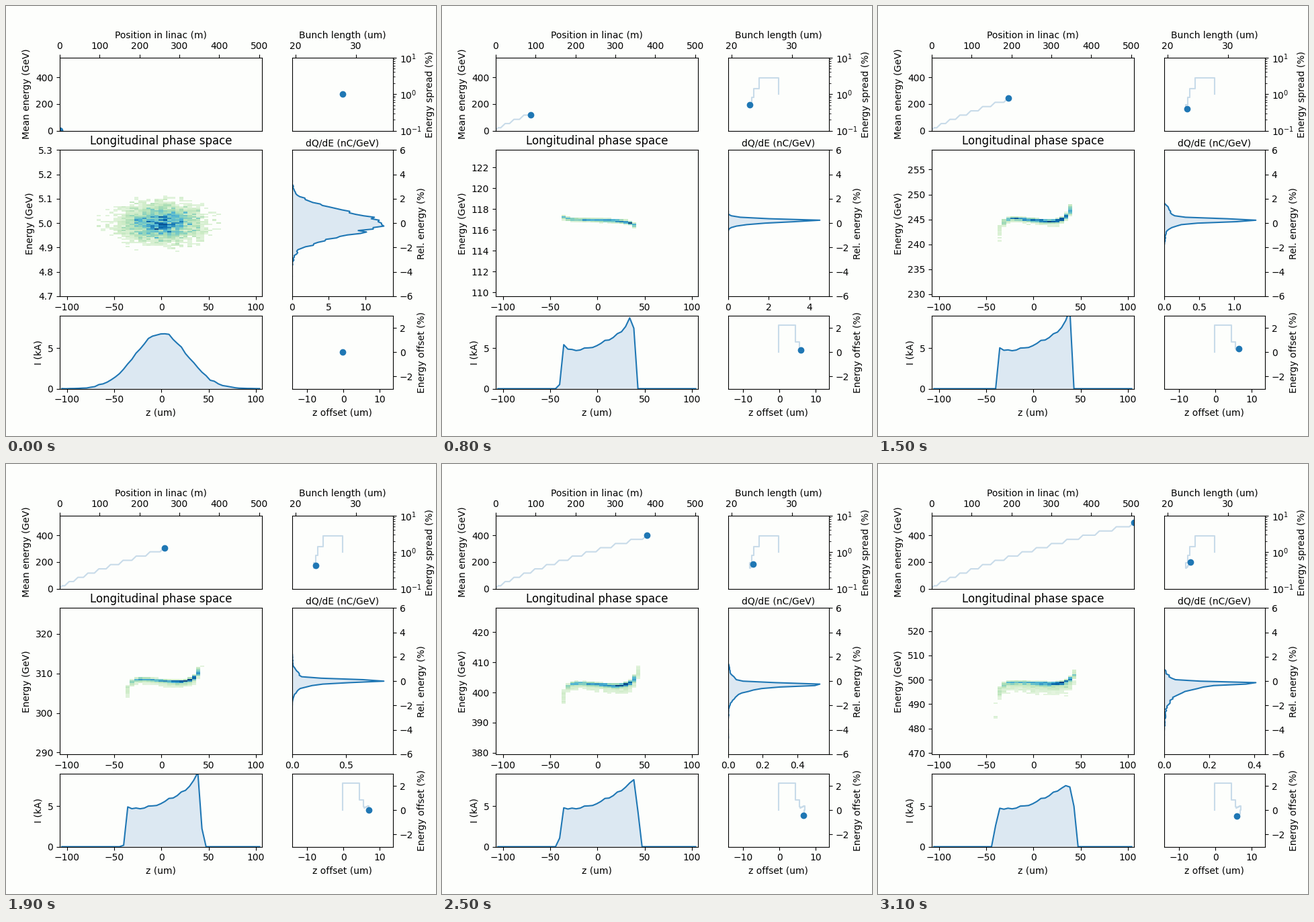
Write a matplotlib script that moves like this. It is 640 by 640 pixels and loops after 3200 ms.

```python
import numpy as np
import matplotlib.pyplot as plt
from matplotlib.animation import FuncAnimation

FRAMES = 32
BG, BLUE, FILL, TRAIL = "#fdfefc", "C0", "#dce8f2", "#c8dbe9"
Z_MIN, Z_MAX, NZ, NE = -107.5, 106.1, 49, 99
PARTICLES = 8000

z_edges = np.linspace(Z_MIN, Z_MAX, NZ + 1)
z_mid = (z_edges[1:] + z_edges[:-1]) / 2
e_edges = np.linspace(-6, 6, NE + 1)
e_mid = (e_edges[1:] + e_edges[:-1]) / 2
bins = np.arange(NZ)

idx = np.arange(FRAMES)
stage = (idx + 1) // 2      # energy changes on odd steps
drift = idx // 2            # bunch shape changes on even steps

energy = np.where(stage == 0, 5, 20.95 + 31.9 * (stage - 1))
step = np.where(idx % 2, 11.14, 1.503 * np.sqrt(energy))
step[:2] = 0, 5.57
position = np.cumsum(step)
offset = np.interp(stage, [0, 1, 2, 3, 4, 9, 10, 13, 16],
                   [0, 2.24, .855, .3, .18, .34, 0, -.45, -.48])
spread = np.interp(stage, [0, 1, 2, 3, 4, 5, 8, 16],
                   [1, 2.78, 1.39, .82, .51, .37, .395, .53])
length = np.interp(drift, [0, 1, 2, 4, 15], [27.8, 24.55, 23.7, 23.05, 23.83])
z_off = np.interp(drift, [0, 1, 2, 4, 9, 12, 15],
                  [-.25, 4.35, 5.55, 5.95, 6.9, 6.7, 5.95])
mean_energy = energy * (1 + offset / 100)
peak = np.exp(np.interp(stage, [0, 1, 2, 4, 8, 10, 13, 16],
                        np.log([12.5, 3, 3.32, 4.52, 1.31, .849, .528, .408])))

# Energy along the bunch: level and slope in the middle, bends at both ends
KEYS = [1, 2, 4, 8, 10, 13, 16]
level = np.interp(stage, KEYS, [2.5, 1.25, .22, .2, 0, -.3, -.17])
slope = np.interp(stage, KEYS, [.15, .075, -.01, -.035, -.03, -.028, -.015])
left_bend = np.interp(stage, KEYS, [2, .9, .08, -.7, -.55, -.6, -.4])
right_bend = np.interp(stage, KEYS, [-8, -4, -.4, 1.6, 1.35, 1, .65])

ripple = np.random.default_rng(3).normal(0, .1, NZ)


def current(m):
    bell = 6.8 * np.exp(-((bins - 24.1) * 4.36 / 27.8)**2 / 2)
    bell += 1.2 * ripple * np.sqrt(bell / 6.8)
    if m == 0:
        return bell
    if m == 1:
        return (bell + current(2)) / 2
    left = 15.5 - .55 * ((m - 7) / 8)**2
    right = 33.2 + .1 * abs(m - 4)
    cover = np.clip(bins + .5 - left, 0, 1) * np.clip(right - bins + .5, 0, 1)
    ramp = 4.65 + .014 * (bins - 17)**2 + ripple
    horns = 2 * np.exp(-m / 4 + 16 - bins) + (3.6 - .3 * m) * np.exp(bins - 33.0)
    return cover * (ramp + horns)


def chirp(i, k):
    # The bunch is longer until the first two compressions are done
    stretch = {1: 1.8, 2: 1.3, 3: 1.3}.get(i, 1)
    k = 24.6 + (k - 24.6) / stretch
    return (level[i] + slope[i] * (k - 25)
            + left_bend[i] * np.exp(np.clip((16.5 - k) / .9, -9, 2))
            + right_bend[i] * np.exp(np.clip((k - 33.5) / 1.55, -9, 1)))


def phase_space(i):
    n = stage[i]
    if n == 0:
        d, sigma, tail, mix = e_mid[None, None, :], 1, 1, 0
    else:
        k = bins[:, None] + np.linspace(-.45, .45, 9)
        d = e_mid - chirp(i, k)[..., None]
        sigma, tail, mix = (.24 if n == 1 else .09), .13 * np.exp(.122 * (n - 4)), .6
    core = np.exp(-d**2 / (2 * sigma**2))
    low = (1 - mix) * core + mix * np.exp(np.minimum(d, 0) / tail)
    area = sigma * np.sqrt(2 * np.pi) * (1 - mix / 2) + mix * tail
    pdf = np.where(d > 0, core, low).mean(axis=1) * (12 / NE) / area
    weight = np.maximum(current(drift[i]), 0)
    rate = PARTICLES * weight[:, None] / weight.sum() * pdf
    return np.random.default_rng(40 + i).poisson(rate).T


plt.rcParams["font.family"] = "DejaVu Sans"
fig, axes = plt.subplots(3, 2, figsize=(6.4, 6.4), dpi=100, facecolor=BG,
                         gridspec_kw=dict(width_ratios=[2, 1], height_ratios=[1, 2, 1]))
(ax_mean, ax_spread), (ax_phase, ax_spec), (ax_cur, ax_off) = axes
for ax in axes.flat:
    ax.set_facecolor(BG)
for ax in axes[0]:
    ax.xaxis.tick_top()
    ax.xaxis.set_label_position("top")
for ax in axes[:, 1]:
    ax.yaxis.tick_right()
    ax.yaxis.set_label_position("right")

ax_mean.set(xlim=(0, position[-1]), ylim=(0, 1.1 * energy[-1]),
            xlabel="Position in linac (m)", ylabel="Mean energy (GeV)")
ax_spread.set(xlim=(.7 * 27.8, 1.3 * 27.8), yscale="log", ylim=(.1, 10),
              xlabel="Bunch length (um)", ylabel="Energy spread (%)")
ax_phase.set(title="Longitudinal phase space", ylabel="Energy (GeV)")
ax_spec.set(ylim=(-6, 6), xlabel="dQ/dE (nC/GeV)", ylabel="Rel. energy (%)")
ax_spec.xaxis.set_label_position("top")
ax_cur.set(xlim=(Z_MIN, Z_MAX), ylim=(0, 9.04), xlabel="z (um)", ylabel="I (kA)")
ax_off.set(xlim=(-14.15, 13.65), ylim=(-3, 3),
           xlabel="z offset (um)", ylabel="Energy offset (%)")


def trail(ax, x, y):
    line, = ax.plot([], [], color=TRAIL)
    dot, = ax.plot([], [], "o", color=BLUE)
    return line, dot, x, y


def filled(ax):
    area, = ax.fill([0, 0, 0], [0, 0, 0], color=FILL, lw=0)
    line, = ax.plot([], [], color=BLUE)
    return area, line


def closed(v, ends):
    return np.r_[ends[0], v, ends[1]]


trails = [trail(ax_mean, position, mean_energy),
          trail(ax_spread, length, spread),
          trail(ax_off, z_off, offset)]
spec_area, spec_line = filled(ax_spec)
cur_area, cur_line = filled(ax_cur)
image = ax_phase.imshow(np.zeros((NE, NZ)), cmap="GnBu", vmin=0, vmax=1, origin="lower",
                        aspect="auto", interpolation="nearest")


def draw(i):
    for line, dot, x, y in trails:
        line.set_data(x[:i + 1], y[:i + 1])
        dot.set_data([x[i]], [y[i]])

    counts = phase_space(i)
    lo, hi = .94 * energy[i], 1.06 * energy[i]
    image.set_data(np.ma.masked_less(counts / counts.max(), .1))
    image.set_extent((Z_MIN, Z_MAX, lo, hi))
    ax_phase.set(xlim=(Z_MIN, Z_MAX), ylim=(lo, hi))

    charge = counts.sum(axis=1)
    charge = charge / charge.max() * peak[i]
    spec_line.set_data(charge, e_mid)
    spec_area.set_xy(np.column_stack([closed(charge, (0, 0)), closed(e_mid, e_mid[[0, -1]])]))
    ax_spec.set_xlim(0, 1.1 * peak[i])

    amps = current(drift[i])
    cur_line.set_data(z_mid, amps)
    cur_area.set_xy(np.column_stack([closed(z_mid, z_mid[[0, -1]]), closed(amps, (0, 0))]))


anim = FuncAnimation(fig, draw, frames=FRAMES, interval=100, init_func=lambda: draw(0),
                     repeat=True, repeat_delay=0)
plt.show()
```
